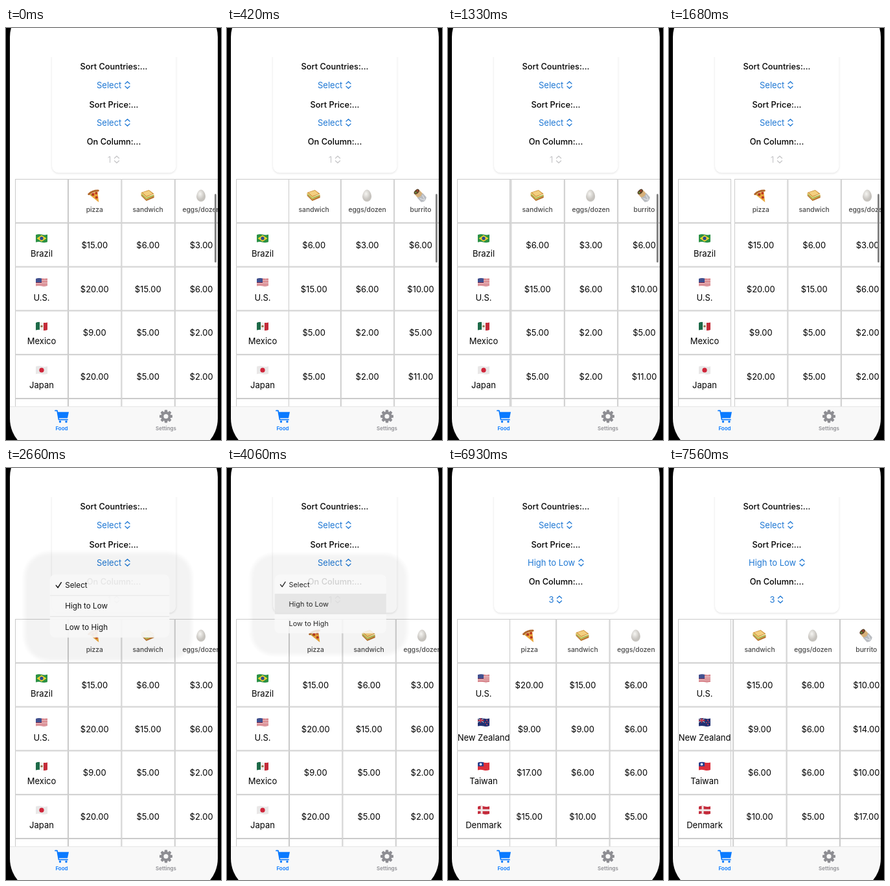
Animation, 332 px wide and 636 px high, one loop 8 s. Source, as an HTML page:

```html
<!DOCTYPE html>
<html lang="en">
<head>
<meta charset="utf-8">
<title>Food price table</title>
<style>
  html, body { margin: 0; width: 100%; height: 100%; overflow: hidden; background: #fff; }
  svg { display: block; width: 332px; height: 636px; }
  text { font: 13px Inter, "Liberation Sans", sans-serif; fill: #000; }
  .mid { text-anchor: middle; }
  .label { font-size: 12.8px; font-weight: 500; text-anchor: middle; }
  .food { font-size: 10.3px; font-weight: 500; fill: #484848; text-anchor: middle; }
  .tab { font-size: 8px; font-weight: 600; text-anchor: middle; }
  .cell { fill: #fff; stroke: #cacaca; }
  .card { fill: #fff; filter: drop-shadow(0 1px 1.5px rgba(0,0,0,.12)); }
</style>
</head>
<body>
<svg viewBox="0 0 332 636">
  <defs>
    <clipPath id="cardClip"><path d="M60 45H275V235H60Z"/></clipPath>
    <clipPath id="gridClip"><path d="M96 230H328V590H96Z"/></clipPath>
    <clipPath id="flagClip"><path d="M-9-5.5Q-4.5-7.4 0-6T9-6V5.5Q4.5 7.4 0 6T-9 6Z"/></clipPath>
    <filter id="blur" x="-20%" y="-20%" width="140%" height="140%"><feGaussianBlur stdDeviation="4"/></filter>
    <radialGradient id="shell" cx=".4" cy=".35"><stop offset="0" stop-color="#f6f5f2"/><stop offset="1" stop-color="#c6c3be"/></radialGradient>
  </defs>
  <path d="M0 0H332V636H0Z" fill="#fff"/>
  <g clip-path="url(#cardClip)"><rect class="card" x="71" y="20" width="191.5" height="203.5" rx="10"/></g>
  <text class="label" x="166.5" y="64">Sort Countries:...</text>
  <text class="label" x="166.5" y="122.5">Sort Price:...</text>
  <text class="label" x="166.5" y="179.5">On Column:...</text>
  <g id="pickers"></g>
  <g clip-path="url(#gridClip)"><g id="grid"></g></g>
  <g id="side"></g>
  <rect id="bar" x="322" y="256" width="3" height="106" rx="1.5" fill="#858585"/>
  <g id="tabs"></g>
  <g id="menus"></g>
  <path fill-rule="evenodd" d="M0 0H332V636H0ZM6 14A52 52 0 0 1 58-38H275A52 52 0 0 1 327 14V603A52 52 0 0 1 275 655H58A52 52 0 0 1 6 603Z"/>
</svg>
<script>
const LOOP = 8000, STEP = 70, COL = 82.4, ROW = 67.8, TOP = 233, BLUE = '#1f78d4';
const $ = id => document.getElementById(id);

// Linear track through [time, value] points
function track(points, t) {
  if (t <= points[0][0]) return points[0][1];
  for (let i = 1; i < points.length; i++) {
    const [a, va] = points[i - 1], [b, vb] = points[i];
    if (t <= b) return va + (vb - va) * (t - a) / (b - a);
  }
  return points[points.length - 1][1];
}
const clamp = v => Math.max(0, Math.min(1, v));
const text = (cls, x, y, s, extra = '') => `<text class="${cls}" x="${x}" y="${y}" ${extra}>${s}</text>`;
const path = (d, fill) => `<path d="${d}" fill="${fill}"/>`;
const line = (d, color, w) => `<path d="${d}" fill="none" stroke="${color}" stroke-width="${w}" stroke-linecap="round" stroke-linejoin="round"/>`;
const dot = (x, y, r, fill) => `<circle cx="${x}" cy="${y}" r="${r}" fill="${fill}"/>`;
const cell = (x, y, w) => `<rect class="cell" x="${x + .5}" y="${y + .5}" width="${w}" height="${ROW - 1}"/>`;
const at = (x, y, s) => `<g transform="translate(${x} ${y})">${s}</g>`;

const field = c => path('M-9-8H9V8H-9Z', c);
const nordic = (bg, fg) => field(bg) + path('M-9-1.5H-4.5V-8H-1.5V-1.5H9V1.5H-1.5V8H-4.5V1.5H-9Z', fg);
const stripes = () => [-5.5, -2.6, .3, 3.2, 6].map(y => path(`M-9 ${y}H9v1.4H-9Z`, '#c8454f')).join('');

const flags = {
  br: field('#2b9145') + path('M0-5L7.5 0 0 5-7.5 0Z', '#f2d52e') + dot(0, 0, 2.7, '#2b4a94'),
  us: field('#f3eeee') + stripes() + path('M-9-8H0V.5H-9Z', '#41508f'),
  mx: field('#eeeeea') + path('M-9-8H-3V8H-9Z', '#1d6a48') + path('M3-8H9V8H3Z', '#c42c38') + dot(0, 0, 1.7, '#94734a'),
  jp: field('#e9e7e7') + dot(0, 0, 3.6, '#cf2338'),
  tw: field('#dc2f3c') + path('M-9-8H0V0H-9Z', '#25408f') + dot(-4.5, -3, 1.8, '#fff'),
  fi: nordic('#e9ebf0', '#2b4784'),
  dk: nordic('#c42b3b', '#f0eaea'),
  nz: field('#203173') + line('M-9-6L0 0M0-6L-9 0', '#ddd', 1) + line('M-4.5-7V0M-9-3H0', '#c93445', 1.6) +
      dot(5, -3, 1, '#d84a58') + dot(5, 3.6, 1, '#d84a58') + dot(3, .3, .9, '#d84a58') + dot(7, -.3, .9, '#d84a58')
};

const foods = [
  ['pizza', path('M-8-2L5-7 7 10Z', '#e9a63a') + line('M-8.5-2.5Q-3-8 6-8', '#b0662a', 3) +
    dot(-2, -2, 2.2, '#bb3822') + dot(3, -4, 1.9, '#bb3822') + dot(3.5, 2.5, 2, '#bb3822') + dot(-4, -1, .8, '#5c8a32')],
  ['sandwich', path('M-10 0L-2 8 10 3V-1L-2 4-10-4Z', '#b97732') + path('M-10-2L-2 5.5 10 0V-2L-2 2-10-5Z', '#f3dc7a') +
    line('M-9-2L-2 4 9-.5', '#6da03c', 1) + path('M-10-5L2-9 10-3-2 2Z', '#cf9038') + path('M-8-5L2-8 8-3-2 .5Z', '#f3cf80')],
  ['eggs/dozen', path('M0-9.5C4-9.5 7-3 7 1.5A7 7.5 0 0 1-7 1.5C-7-3-4-9.5 0-9.5Z', 'url(#shell)')],
  ['burrito', `<g transform="rotate(-42)"><rect x="-5" y="-10" width="10" height="19" rx="4" fill="#d6b07a"/>` +
    path('M-5.5-1L0 1 5.5-1V8Q0 13-5.5 8Z', '#b9bcc1') + line('M-3 3L0 9M3 2L1 9', '#e4e6e9', 1) +
    `<ellipse cy="-8.5" rx="4.8" ry="3" fill="#5c4029"/></g>` + dot(-7, -5, 1.3, '#6c9b3c') + dot(-4.5, -7.5, 1.2, '#b8452c')],
  ['oranges/lb', dot(0, 1.5, 8, '#ec7f1c') + dot(-2, -1, 4, '#f59b35') + path('M0-5Q1-10 7-9 6-4 0-5Z', '#4f8a38') + line('M0-5L-1-8', '#6b5a2c', 1.2)]
];

const countries = {
  br: ['Brazil', 15, 6, 3, 6, 1], us: ['U.S.', 20, 15, 6, 10, 1],
  mx: ['Mexico', 9, 5, 2, 5, 1], jp: ['Japan', 20, 5, 2, 11, 2],
  tw: ['Taiwan', 17, 6, 6, 10, 2], fi: ['Finland', 16, 10, 4, 12, 2],
  nz: ['New Zealand', 9, 9, 6, 14, 2], dk: ['Denmark', 15, 10, 5, 17, 2]
};

// Label text with its left edge and chevron centre
const SELECT = ['Select', 140, 187.5], HIGH = ['High to Low', 123, 205.5];
const states = [
  { from: 0, rows: ['br', 'us', 'mx', 'jp'], price: SELECT, column: ['1', 157, 171], on: false },
  { from: 4130, rows: ['us', 'jp', 'tw', 'fi'], price: HIGH, column: ['1', 157, 171], on: true },
  { from: 5950, rows: ['us', 'nz', 'tw', 'dk'], price: HIGH, column: ['3', 155.5, 172], on: true }
];

const menus = [
  { top: 164.5, items: ['Select', 'High to Low', 'Low to High'], pick: 1, hit: [[3990, 0], [4060, 1]],
    size: [[2380, 0], [2450, .3], [2520, .55], [2660, .9], [2800, 1.02], [2940, 1.01], [3150, 1],
           [3990, 1], [4060, .84], [4130, .6], [4200, .4], [4270, 0]] },
  { top: 221, items: ['1', '2', '3', '4', '5', '6', '7'], pick: 2, hit: [[5530, 0], [5670, 1]],
    size: [[4830, 0], [4900, .3], [4970, .55], [5110, .9], [5250, 1.01], [5320, 1], [5460, 1],
           [5810, 1], [5880, .84], [5950, .6], [6020, .42], [6090, .3], [6160, 0]] }
];

const scroll = [
  [70, 0], [210, -14], [350, -60], [490, -110], [630, -146], [840, -173], [910, -174],
  [980, -174], [1120, -160], [1260, -110], [1400, -52], [1540, -12], [1680, 5], [1820, 6],
  [1890, 3.5], [1960, 1.5], [2030, 0], [6860, 0], [6930, -11.2], [7070, -34], [7280, -62], [7560, -79.2]
];

function picker(id, [label, x, cx], y, color) {
  return `<g id="${id}">${text('', x, y + 4.7, label, `style="fill:${color}"`)}` +
    line(`M${cx - 3.5} ${y - 2}l3.5-3.3 3.5 3.3M${cx - 3.5} ${y + 2}l3.5 3.3 3.5-3.3`, color, 1.3) + '</g>';
}

function drawState(s) {
  $('pickers').innerHTML = picker('country', SELECT, 88, BLUE) + picker('button0', s.price, 146, BLUE) +
    picker('button1', s.column, 203, s.on ? BLUE : '#c6c6c8');
  let side = cell(14, TOP, 81), grid = '';
  for (let r = 0; r < 5; r++) {
    const y = TOP + ROW * (r + 1), key = s.rows[r];
    side += cell(14, y, 81);
    if (key) side += at(55, y + 24, `<g clip-path="url(#flagClip)">${flags[key]}</g>`) + text('mid', 55, y + 51.9, countries[key][0]);
  }
  for (let c = 0; c < 7; c++) {
    const x = 96 + COL * c, mid = x + COL / 2 - .4;
    for (let r = 0; r < 6; r++) grid += cell(x, TOP + ROW * r, COL - 1);
    if (!foods[c]) continue;
    grid += at(mid - .5, 259, foods[c][1]) + text('food', mid, 283.6, foods[c][0]);
    s.rows.forEach((key, r) => {
      grid += text('mid', mid, TOP + ROW * (r + 1) + 38.9, `$${countries[key][c + 1]}.00`);
    });
  }
  $('side').innerHTML = side;
  $('grid').innerHTML = grid;
}

function drawMenu({ top, items, pick }, i) {
  const h = items.length * 36;
  let s = `<rect x="14" y="${top - 38}" width="288" height="${h + 78}" rx="42" opacity=".05" filter="url(#blur)"/>` +
    `<rect x="58" y="${top}" width="205" height="${h}" rx="9" fill="#f7f7f7"/>` +
    `<rect id="hit${i}" x="58" y="${top + pick * 36}" width="205" height="36" fill="#e2e2e2"/>`;
  items.forEach((item, r) => {
    const y = top + r * 36 + 18;
    if (r) s += path(`M58 ${y - 18.5}h205v1h-205Z`, '#dedede');
    s += text('', 84, y + 4.7, item);
  });
  return `<g id="menu${i}">${s}${line(`M68.5 ${top + 18.5}l3.2 4 5.8-9`, '#000', 1.6)}</g>`;
}

function drawTabs() {
  const blue = '#0a7aff', gray = '#8e8e93';
  let teeth = '';
  for (let a = 0; a < 360; a += 45) teeth += `<rect x="-2.2" y="-10" width="4.4" height="5" rx="1" transform="rotate(${a})" fill="${gray}"/>`;
  const gear = teeth + `<circle r="5.6" fill="none" stroke="${gray}" stroke-width="4"/>`;
  const cart = line('M-10.5-9H-7.5L-5 5H8.5', blue, 1.7) + path('M-7.5-7H10.5L8.5 2.5H-5.5Z', blue) + dot(-3, 8, 1.7, blue) + dot(6.5, 8, 1.7, blue);
  $('tabs').innerHTML = path('M0 584H332V636H0Z', '#f8f8f8') + path('M0 584H332v1H0Z', '#e6e6e6') +
    at(86.5, 599.7, cart) + at(247, 599.5, gear) +
    text('tab', 86, 621, 'Food', `style="fill:${blue}"`) + text('tab', 247, 621, 'Settings', `style="fill:${gray}"`);
}

let shown;
function render(time) {
  const t = Math.floor(time / STEP) * STEP;
  const state = states.filter(s => s.from <= t).pop();
  if (state !== shown) drawState(shown = state);
  $('grid').setAttribute('transform', `translate(${track(scroll, t)} 0)`);
  $('bar').setAttribute('opacity', track([[2100, 1], [2240, 0]], t));
  menus.forEach((m, i) => {
    const k = track(m.size, t), g = $('menu' + i);
    g.setAttribute('transform', `translate(156 ${m.top}) scale(${k}) translate(-156 ${-m.top})`);
    g.setAttribute('opacity', clamp((k - .25) / .7));
    g.setAttribute('display', k > 0 ? 'inline' : 'none');
    $('hit' + i).setAttribute('opacity', track(m.hit, t));
    $('button' + i).setAttribute('opacity', k > .9 ? .55 : 1);
  });
}

drawTabs();
$('menus').innerHTML = menus.map(drawMenu).join('');
const start = performance.now();
function tick() {
  render((performance.now() - start) % LOOP);
  requestAnimationFrame(tick);
}
tick();
</script>
</body>
</html>
```
